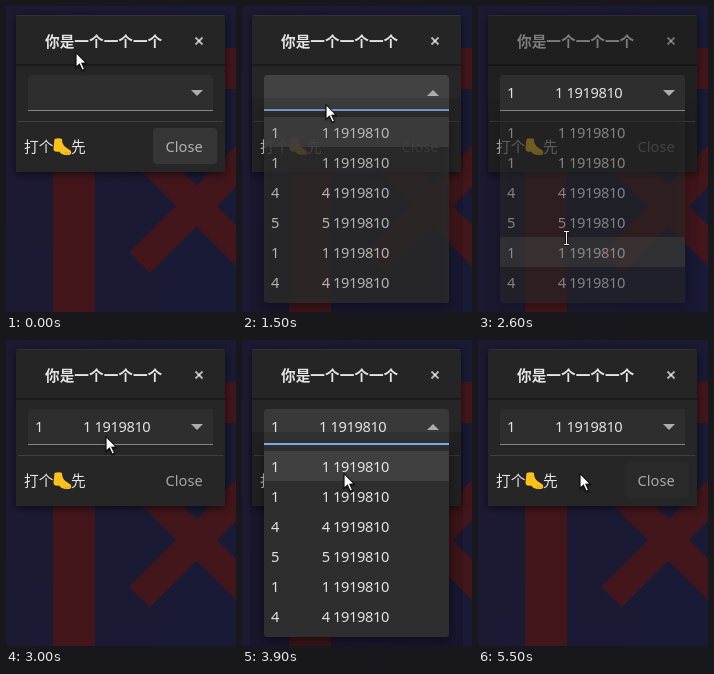
An HTML page with a canvas for the animation above (5700 ms loop, 230 by 306 pixels).

```html
<!DOCTYPE html>
<html lang="zh">
<head>
<meta charset="utf-8">
<style>
  html, body { margin: 0; width: 230px; height: 306px; overflow: hidden; background: #1c1932; }
  canvas { display: block; }
</style>
</head>
<body>
<canvas id="stage" width="230" height="306"></canvas>
<script>
const ctx = document.getElementById('stage').getContext('2d');
const LOOP = 5700, STEP = 100;
const FAMILY = '"Noto Sans", "Noto Sans CJK SC", sans-serif';
const COMBO = [22, 69, 185, 36];
const ROW = 30, LIST_TOP = 111;

// Rises from 0 to 1 between two times.
const ramp = (t, from, to) => Math.min(1, Math.max(0, (t - from) / (to - from)));
const between = (t, from, to) => t >= from && t < to;
const white = alpha => `rgba(255,255,255,${alpha})`;
const black = alpha => `rgba(0,0,0,${alpha})`;

function rect(x, y, w, h, fill) {
  ctx.fillStyle = fill;
  ctx.fillRect(x, y, w, h);
}

function box(x, y, w, h, radius, fill) {
  ctx.beginPath();
  ctx.roundRect(x, y, w, h, radius);
  ctx.fillStyle = fill;
  ctx.fill();
}

function shape(fill, ...points) {
  ctx.beginPath();
  points.forEach(p => ctx.lineTo(...p));
  ctx.closePath();
  ctx.fillStyle = fill;
  ctx.fill();
}

function line(color, width, x1, y1, x2, y2) {
  ctx.beginPath();
  ctx.moveTo(x1, y1);
  ctx.lineTo(x2, y2);
  ctx.strokeStyle = color;
  ctx.lineWidth = width;
  ctx.stroke();
}

function cross(x, y, arm, width, color) {
  line(color, width, x - arm, y - arm, x + arm, y + arm);
  line(color, width, x - arm, y + arm, x + arm, y - arm);
}

function text(value, x, y, color, weight = 400, spacing = 0) {
  ctx.font = `${weight} 14.67px ${FAMILY}`;
  ctx.letterSpacing = spacing + 'px';
  ctx.fillStyle = color;
  ctx.fillText(value, x, y);
}

function entry(n, x, y) {
  text(n, 29, y, '#e2e2e2', 400, -0.39);
  text(n + ' 1919810', x, y, '#e2e2e2', 400, -0.39);
}

function withShadow(blur, offset, alpha, paint) {
  ctx.save();
  ctx.shadowColor = black(alpha);
  ctx.shadowBlur = blur;
  ctx.shadowOffsetY = offset;
  paint();
  ctx.restore();
}

function wallpaper() {
  const navy = ctx.createLinearGradient(0, 0, 230, 60);
  navy.addColorStop(0, '#1e1932');
  navy.addColorStop(1, '#191a35');
  rect(0, 0, 230, 306, navy);
  const red = '#42161b';
  rect(47, 100, 42, 206, red);
  rect(140, 42, 90, 41, red);
  cross(190.5, 200, 57, 29, red);
}

function foot() {
  ctx.beginPath();
  ctx.moveTo(48.5, 133);
  ctx.quadraticCurveTo(53, 131.5, 56, 133);
  ctx.quadraticCurveTo(56, 139, 60, 141.5);
  ctx.lineTo(64.5, 144.5);
  ctx.quadraticCurveTo(66.5, 147.5, 63.5, 149);
  ctx.lineTo(59, 149);
  ctx.quadraticCurveTo(55, 148.5, 53, 145.5);
  ctx.quadraticCurveTo(47.5, 146.5, 47.5, 142.5);
  ctx.closePath();
  ctx.fillStyle = '#fcc21b';
  ctx.fill();
  for (let x = 59; x <= 63; x += 2) line('#e09a1c', 0.8, x, 146, x + 0.5, 148.5);
}

function combo(t, open, hover) {
  ctx.save();
  ctx.beginPath();
  ctx.roundRect(...COMBO, [4, 4, 0, 0]);
  ctx.clip();
  rect(...COMBO, '#2e2e2e');
  rect(...COMBO, white(0.055 * hover));
  for (const press of [1080, 3300]) {
    if (!between(t, press, press + 500)) continue;
    ctx.beginPath();
    ctx.arc(114.5, 87, (t - press) / 2, 0, 7);
    ctx.fillStyle = white(0.1 - 0.07 * ramp(t, press + 200, press + 500));
    ctx.fill();
  }
  rect(22, 104, 185, 1, '#858585');
  ctx.restore();
  const flip = open ? -3 : 3;
  shape('#adadad', [185, 87 - flip], [197, 87 - flip], [191, 87 + flip]);
  if (t >= 2300) entry('1', 77, 92);
}

function dialog(t, open, focus) {
  withShadow(9, 2, 0.6, () => box(10, 9, 209, 157, [3, 3, 0, 0], '#262626'));
  rect(10, 9, 209, 157, black(0.15 * (1 - focus)));
  rect(10, 9, 209, 50, black(0.04));
  rect(10, 9, 209, 1, white(0.06));
  rect(10, 58, 209, 2, black(0.3));
  text('你是一个一个一个', 39, 41, white(0.42 + 0.46 * focus), 700);
  cross(193, 35, 3.5, 1.8, white(0.36 + 0.32 * focus));

  const hover = ramp(t, 700, 1000) - ramp(t, 2300, 2600) + ramp(t, 3100, 3300) - ramp(t, 4000, 4400);
  combo(t, open, hover);
  rect(12, 115, 205, 1, '#3e3e3e');

  const lit = 1 - ramp(t, 1000, 1200) + ramp(t, 5400, 5800);
  box(147, 122, 64, 36, 4, white(0.075 * lit));
  text('Close', 159.5, 146, white(0.4 + 0.18 * focus + 0.03 * lit));
  const label = white(0.72 + 0.16 * focus);
  text('打个', 18, 146, label);
  foot();
  text('先', 65, 146, label);
}

function popup(t, alpha, open, cursorY) {
  if (alpha <= 0) return;
  ctx.save();
  ctx.globalAlpha = alpha;
  ctx.beginPath();
  ctx.rect(8, 92, 213, 214);
  ctx.clip();
  rect(8, 92, 213, 214, black(0.15));
  withShadow(10, 3, 0.45, () => box(22, 105, 185, 192, [0, 0, 3, 3], '#2e2e2e'));
  if (open) rect(22, 103, 185, 2, '#7baaf0');

  // Highlights fade late, so the hovered row trails the pointer.
  const rowAt = y => Math.floor((y - LIST_TOP) / ROW);
  const hovered = between(t, 2200, 3200) ? 4 : rowAt(cursorY - (t < 2200 ? ROW : 0));
  [...'114514'].forEach((n, i) => {
    const y = LIST_TOP + ROW * i;
    if (i === hovered || i === 0 && t < 2200) rect(22, y, 185, ROW, '#404040');
    entry(n, 79.7, y + 21);
  });
  ctx.restore();
}

function pointer(x, y) {
  ctx.save();
  ctx.translate(x, y);
  withShadow(2, 1, 0.5, () => shape('#111', [0, 0], [0, 17], [3.7, 13.6], [6.5, 19.5],
    [9.6, 18], [7, 12.5], [12, 12.2]));
  shape('#fff', [1.1, 2.6], [1.1, 14.5], [4.1, 11.8], [7, 18], [8.3, 17.3], [5.5, 11.3], [9.5, 11.1]);
  ctx.restore();
}

function textPointer(x, y) {
  for (const [color, width] of [['#111', 3], ['#eee', 1]]) {
    line(color, width, x, y - 6, x, y + 6);
    for (const end of [-6.5, 6.5]) line(color, width, x - 2.5, y + end, x + 2.5, y + end);
  }
}

function draw(t) {
  const toCombo = ramp(t, 700, 800), downList = ramp(t, 1500, 2200);
  const back = ramp(t, 2600, 3000), toRow = ramp(t, 3400, 3900);
  const x = 69.5 + 14 * toCombo + 3 * downList + 13 * back + 2 * toRow;
  const y = 45.5 + 52 * toCombo + 135 * downList - 137 * back + 37 * toRow;

  const alpha = ramp(t, 1200, 1600) - ramp(t, 2300, 2900) + ramp(t, 3400, 3700) - ramp(t, 4000, 4400);
  const open = between(t, 1300, 2300) || between(t, 3500, 4100);
  const focus = 1 - ramp(t, 2200, 2400) + ramp(t, 2600, 2900);

  wallpaper();
  dialog(t, open, focus);
  popup(t, alpha, open, y);
  // The combo stays clear of the fading list.
  if (between(t, 2400, 2900)) combo(t, false, 0);
  if (between(t, 2400, 2700)) textPointer(88.5, 232);
  else pointer(x, y);
}

function tick(now) {
  draw(Math.floor(now % LOOP / STEP) * STEP);
  requestAnimationFrame(tick);
}
requestAnimationFrame(tick);
</script>
</body>
</html>
```
